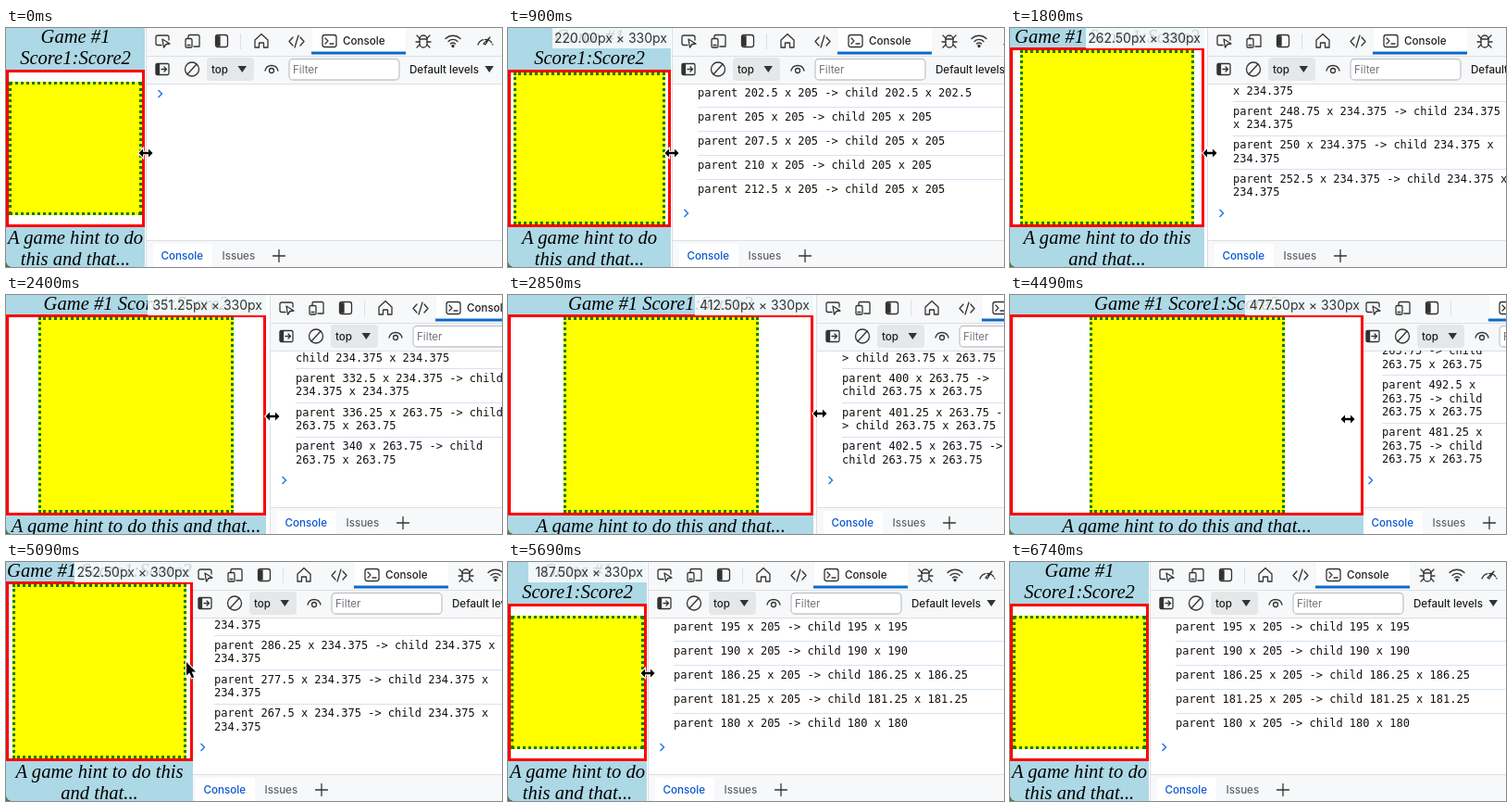
Write an HTML page that moves like this. It is 536 px wide and 258 px high and loops after 7060 ms.

```html
<!DOCTYPE html>
<html lang="en">
<head>
<meta charset="utf-8">
<title>Resizing a game board</title>
<style>
html, body { margin: 0; width: 100%; height: 100%; overflow: hidden; background: #fff; }
div, svg { position: absolute; box-sizing: border-box; }
#stage { width: 536px; height: 258px; overflow: hidden; }

#page {
  top: -2.3px; left: 0; width: var(--w); height: 264px; display: flex; flex-direction: column;
  background: lightblue; text-align: center; font: italic 20.6px/23.5px "Liberation Serif", serif;
}
#page div { position: relative; }
#parent {
  flex: 1; border: 3px solid red; background: #fff; container-type: size;
  display: flex; align-items: center; justify-content: center;
}
#child { width: min(100cqw, 100cqh); aspect-ratio: 1; background: yellow; border: 3px dotted green; }
#tip {
  top: 0; left: calc(var(--w) - 128px); width: 128px; height: 22px; padding-right: 4px;
  background: rgba(255, 255, 255, .82); color: #333; text-align: right; white-space: nowrap;
  font: 14px/22px Inter, sans-serif;
}
#corner {
  left: 0; bottom: 0; width: 6px; height: 6px;
  background: radial-gradient(circle at 100% 0, transparent 5.5px, #4d7a3a 6px);
}

#dev { left: var(--d); top: 0; width: 540px; height: 258px; }
#dev text { font: 500 11.6px Inter, sans-serif; fill: #1f1f1f; stroke: none; }
.narrow #tools { display: none; }
.narrow #tab { transform: translateX(-36px); }
#log { top: 60px; left: 0; width: 100%; height: 169px; overflow: hidden; }
#log div { position: relative; }
#log .row {
  margin-left: 29px; width: calc(509px - var(--d)); min-height: 26px; max-height: 51.1px;
  padding-top: 2.6px; border: solid; border-color: #d3e3f5 transparent transparent; border-width: 1px 0 4px;
  overflow: hidden; font: 12px/14.5px "DejaVu Sans Mono", monospace; color: #111;
}
#log .prompt { height: 40px; }
#cursor path { paint-order: stroke; }
</style>
</head>
<body>
<div id="stage">
  <div id="dev">
    <svg width="540" height="258" viewBox="150 0 540 258" fill="none" stroke="#333" stroke-width="1.3" stroke-linejoin="round" stroke-linecap="round">
      <g stroke="none">
        <path fill="#f7f8f9" d="M152 0h540v60H152zM152 229h540v29H152z"/>
        <path fill="#dcdfe4" d="M151 0h1v258h-1zM152 30h540v1H152zM152 60h540v1H152zM152 229h540v1H152zM253 6h1v17h-1z"/>
        <path fill="#fff" d="M159 233h64v25h-64z"/>
        <rect x="217" y="32" width="51" height="25" rx="4" fill="#e6e7e9"/>
      </g>
      <rect x="306" y="33.5" width="119" height="22.5" rx="4" fill="#fff" stroke="#c4c7cb"/>

      <!-- top bar -->
      <path d="M168 18.5h-4a2 2 0 0 1-2-2V10a2 2 0 0 1 2-2h10a2 2 0 0 1 2 2v3M169 12l1.5 9 2.5-3.5 4-.5z"/>
      <path d="M197 11V9a1.5 1.5 0 0 1 1.5-1.5h9A1.5 1.5 0 0 1 209 9v11h-6M196 18.5h3"/>
      <rect x="194" y="11.5" width="7" height="9.5" rx="1.2"/>
      <rect x="226.5" y="7.5" width="13" height="13" rx="2.5"/>
      <path d="M227 9h4v10h-4z" fill="#333"/>
      <path id="tools" d="M269 13l7-6.5 7 6.5v8h-4.5v-5h-5v5H269zM310 10l-4 4.5 4 4.5M318 10l4 4.5-4 4.5M316 8l-4 13"/>
      <g id="tab">
        <path fill="#fff" stroke="none" d="M331 0h101v26H331z"/>
        <path fill="#0b6bcb" stroke="none" d="M330 25.5h102v3H330z"/>
        <rect x="342" y="7.5" width="15" height="13" rx="2.5"/>
        <path d="M345 11l3 3-3 3M350 17h4"/>
        <text x="364" y="18">Console</text>
      </g>
      <rect x="447" y="8" width="8" height="13" rx="4"/>
      <path d="M447 12h8M443 15h4M455 15h4M444 8l3 3M458 8l-3 3M444 21l3-3M458 21l-3-3"/>
      <path d="M475 11.5a11.5 11.5 0 0 1 16 0M478 14.5a7 7 0 0 1 10 0M480.5 17a4 4 0 0 1 5 0"/>
      <circle cx="483" cy="19.5" r="1" fill="#333"/>
      <path d="M510 18a8.5 8.5 0 0 1 16 0" stroke-dasharray="8 2"/>
      <path d="M516 17l7-7-5 8z"/>

      <!-- filter bar -->
      <rect x="162" y="38.5" width="14" height="12" rx="1.5"/>
      <path d="M162.5 39h3v11h-3z" fill="#333"/>
      <path d="M168 44.5h5M171 42l2.5 2.5-2.5 2.5"/>
      <circle cx="201" cy="44.5" r="7.5"/>
      <path d="M196 50l10-11"/>
      <text x="222" y="48.5">top</text>
      <path d="M250.5 41h9.5l-4.7 7zM517.5 41h9.5l-4.7 7z" fill="#333" stroke="none"/>
      <path d="M280 46a7.2 7.2 0 0 1 14 0"/>
      <circle cx="287" cy="46" r="2.5"/>
      <text x="310" y="49" style="fill:#70757a;font-weight:400">Filter</text>
      <text x="436" y="48.5">Default levels</text>

      <!-- drawer -->
      <text x="167.5" y="250" style="fill:#0b57d0">Console</text>
      <text x="233.5" y="250" style="fill:#5f6368">Issues</text>
      <path d="M288.5 246h13M295 239.5v13"/>
    </svg>
    <div id="log"></div>
  </div>

  <div id="page">
    <div>Game #1 Score1:Score2</div>
    <div id="parent"><div id="child"></div></div>
    <div>A game hint to do this and that...</div>
  </div>
  <div id="tip"></div>
  <div id="corner"></div>

  <svg id="cursor" width="30" height="30" viewBox="-15 -15 30 30" stroke="#fff" stroke-width="2.2" overflow="visible">
    <path id="resize" d="M-7.5 0l4.5-4.5v3.3h6v-3.3L7.5 0 3 4.5V1.2h-6v3.3z"/>
    <path id="arrow" d="M0-7V7.5l3.3-3 2.5 5.7 2.4-1-2.5-5.6H10z"/>
  </svg>
</div>

<script>
const LOOP = 7060, SCALE = .8, TICK = 25;
const START = 600, TIP_END = 6290, EXIT = 6140;
const $ = id => document.getElementById(id);

// Turning points of the drag: time and inner frame width in CSS pixels
const drag = [
  [575, 180], [900, 212.5], [1250, 212.5], [1775, 250], [1850, 257.5], [2800, 400], [2850, 402.5],
  [2900, 407.5], [3550, 541.25], [3625, 545], [3890, 550], [4240, 550], [4465, 492.5], [4565, 447.5],
  [5065, 277.5], [5090, 267.5], [5115, 245], [5140, 237.5], [5590, 195], [5665, 181.25], [5690, 180]
];
const cursorY = [[1800, 135], [2850, 128], [3600, 143], [4340, 143], [4490, 134], [5090, 115], [5690, 120]];

function at(keys, t) {
  const i = keys.findIndex(k => k[0] > t);
  if (i < 0) return keys[keys.length - 1][1];
  if (!i) return keys[0][1];
  const [t0, a] = keys[i - 1], [t1, b] = keys[i];
  return a + (b - a) * (t - t0) / (t1 - t0);
}

const inner = t => Math.round(at(drag, t) / 1.25) * 1.25;
const outer = t => inner(t) + 7.5;

// Each wrapped text line takes one line height from the frame
const innerHeight = w => 263.75 - 29.375 * ((w < 244) + (w < 333));

function message(w) {
  const h = innerHeight(w), side = Math.min(w, h);
  return `parent ${w} x ${h} -> child ${side} x ${side}`;
}

function logRows(t) {
  const rows = [];
  for (let s = t; s >= START && rows.length < 7; s -= TICK)
    if (inner(s) !== inner(s - TICK)) rows.unshift(`<div class="row">${message(inner(s))}</div>`);
  return rows.join("");
}

const prompt = `<div class="prompt"><svg width="30" height="22" fill="none" stroke="#1a73e8" stroke-width="1.4">
  <path d="M14.5 7l4 4-4 4"/></svg></div>`;

// The log lags behind the page, which lags behind the tools and the cursor
function draw(t) {
  const w = outer(t + TICK), left = outer(t + 2 * TICK) * SCALE;
  $("stage").style.setProperty("--w", w * SCALE + "px");
  $("stage").style.setProperty("--d", left + "px");
  $("dev").className = 536 - left < 170 ? "narrow" : "";

  $("tip").textContent = `${w.toFixed(2)}px × 330px`;
  $("tip").style.display = t >= START && t < TIP_END ? "" : "none";

  $("log").innerHTML = logRows(t) + prompt;
  $("log").scrollTop = 9999;

  const away = Math.max(0, t - EXIT);
  const x = outer(t + 3 * TICK) * SCALE + 1 + away * .7;
  const y = at(cursorY, t) + away * .28;
  $("cursor").style.transform = `translate(${x - 15}px, ${y - 15}px)`;
  const pointing = t >= 5040 && t < 5350 || away > 0;
  $("arrow").style.display = pointing ? "" : "none";
  $("resize").style.display = pointing ? "none" : "";
}

// The picture updates every 150 ms, with one short step before 3890
const step = t => {
  const base = t < 3890 ? 0 : 3890;
  return base + Math.floor((t - base) / 150) * 150;
};

let shown = -1;
function frame() {
  const t = step(performance.now() % LOOP);
  if (t !== shown) draw(shown = t);
  requestAnimationFrame(frame);
}
frame();
</script>
</body>
</html>
```
